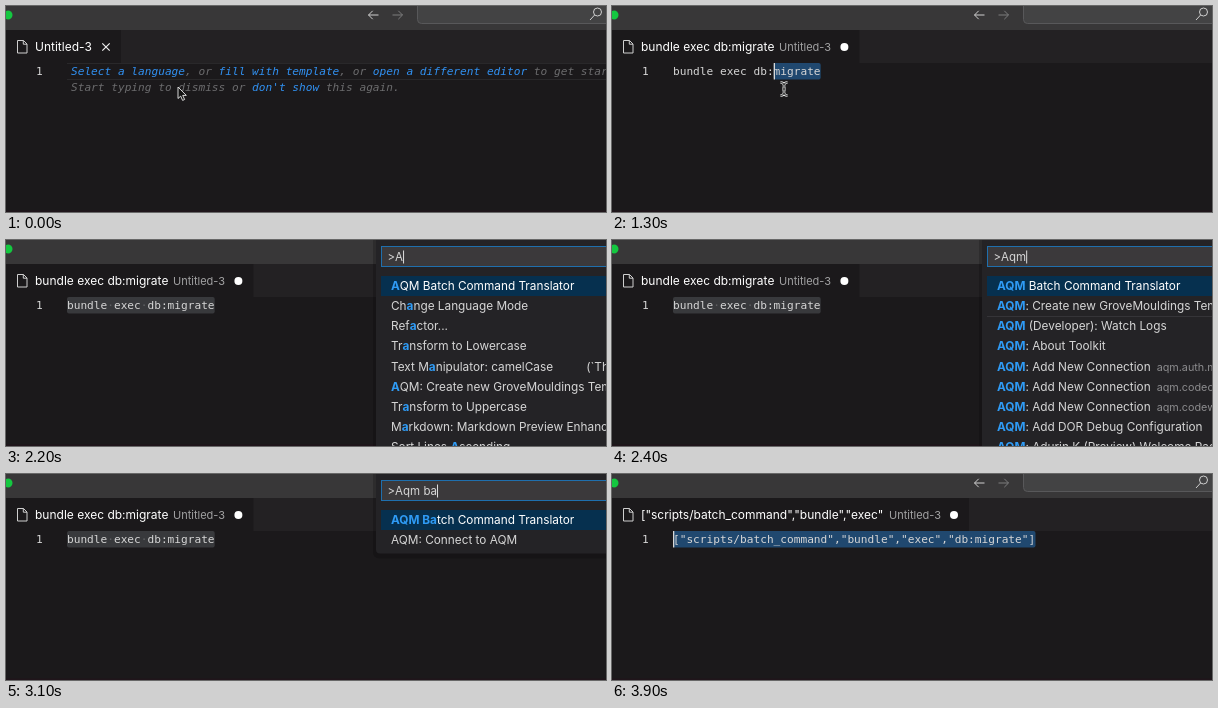
An HTML page for the animation above (4000 ms loop, 600 by 206 pixels).

```html
<!DOCTYPE html>
<html lang="en">
<head>
<meta charset="utf-8">
<title>Command palette demo</title>
<style>
html, body { margin: 0; width: 100%; height: 100%; overflow: hidden; background: #1b191b; }
svg { display: block; width: 600px; height: 206px; }
text { white-space: pre; font: 12px Inter, "Liberation Sans", sans-serif; fill: #d6d6d6; }
.code, .hint { font: 11.15px "DejaVu Sans Mono", monospace; }
.hint { font-style: italic; fill: #6c6c6e; }
.hint .hit { fill: #3191f2; }
.tab { fill: #fff; }
.note { font-size: 11px; fill: #a2a2a3; }
.row { font-size: 11.8px; }
.row:first-child { fill: #fff; }
.row .hit { fill: #2f9bf5; font-weight: 700; }
.row .detail { font-size: 10.8px; fill: #8b8b8d; }
.typed { font-size: 11.5px; }
.line { fill: none; stroke: #cfcfcf; stroke-width: 1; }
</style>
</head>
<body>
<svg viewBox="0 0 600 206">
  <rect width="600" height="206" fill="#1b191b"/>
  <rect y="204.5" width="600" height="1.5" fill="#20151b"/>
  <rect width="600" height="24" fill="#383738"/>
  <rect y="24" width="600" height="33" fill="#232123"/>
  <rect id="tabBack" y="24" height="33" fill="#1b191b"/>
  <circle cx="2" cy="9" r="4.5" fill="#14c840"/>

  <g id="navigation">
    <path class="line" d="M372.5 9H362.5m4.2-4.2L362.5 9l4.2 4.2"/>
    <path class="line" style="stroke:#7c7c7d" d="M386.5 9h10m-4.2-4.2L396.5 9l-4.2 4.2"/>
    <rect x="411.5" y="-8" width="220" height="25.5" rx="4" fill="#434344" stroke="#58585a"/>
    <circle class="line" cx="591.5" cy="6" r="4"/>
    <path class="line" d="M588.6 9l-4.6 5"/>
  </g>

  <path class="line" d="M11.5 34.5h6l3.5 3.5v9h-9.5zM17.3 34.5v3.7h3.7"/>
  <text id="tabTitle" class="tab" x="29" y="45"></text>
  <text id="tabNote" class="note" y="45">Untitled-3</text>
  <path id="tabClose" class="line" style="stroke:#eee;stroke-width:1.2" d="M96.3 37.3l7.4 7.4m0-7.4l-7.4 7.4"/>
  <circle id="tabDot" cy="41" r="4" fill="#fff"/>

  <path id="lineMark" d="M61 57.5h539M61 73.5h539" stroke="#29282a"/>
  <text class="code" x="30" y="68.5">1</text>
  <rect id="selection" y="57" height="16.5" rx="2"/>
  <g id="hint"></g>
  <text id="code" class="code" x="61" y="68.5"></text>
  <text id="spaces" class="code" x="61" y="68.5" opacity=".25"></text>
  <rect id="caret" y="57" width="1.3" height="16.5" fill="#d8d8d8"/>

  <path id="arrow" d="M172 81v11.5l2.7-2.4 1.9 4.3 2-.9-1.9-4.1h3.6z" fill="#111" stroke="#eee" stroke-width=".9"/>
  <g id="beam" fill="none"></g>

  <g id="palette">
    <rect id="shade" x="367" y="-6" width="240" rx="6" fill="#000" opacity=".2"/>
    <rect id="panel" x="370" y="-6" width="240" rx="4" fill="#242326"/>
    <rect x="375.5" y="6.5" width="240" height="20" fill="#3b393b" stroke="#1f6fad"/>
    <text id="typed" class="typed" x="381.5" y="21"></text>
    <rect id="typedCaret" y="10.5" width="1" height="13" fill="#ddd"/>
    <rect x="375" y="36" width="225" height="20" fill="#06304f"/>
    <path id="divider" d="M375 76.5h225" stroke="#353438"/>
    <g id="rows"></g>
  </g>
</svg>
<script>
const LOOP = 4000, STEP = 100, LEFT = 61, CHAR = 6.713, ROW = 20.2;
const COMMAND = "bundle exec db:migrate";
const RESULT = '["scripts/batch_command","bundle","exec","db:migrate"]';

// Asterisks enclose highlighted parts; a bar starts the dim detail.
const RECENT = [
  "*A*QM Batch Command Translator", "Ch*a*nge Language Mode", "Ref*a*ctor...",
  "Tr*a*nsform to Lowercase", "Text M*a*nipulator: camelCase          (`This`)",
  "*A*QM: Create new GroveMouldings Template", "Tr*a*nsform to Uppercase",
  "M*a*rkdown: Markdown Preview Enhanced", "Sort Lines *A*scending"
];
const MATCHES = [
  "*AQM* Batch Command Translator", "*AQM*: Create new GroveMouldings Template",
  "*AQM* (Developer): Watch Logs", "*AQM*: About Toolkit",
  "*AQM*: Add New Connection|aqm.auth.manage", "*AQM*: Add New Connection|aqm.codecase",
  "*AQM*: Add New Connection|aqm.codeworks", "*AQM*: Add DOR Debug Configuration",
  "*AQM*: Adurin K (Preview) Welcome Page"
];
const NARROWED = ["*AQM Ba*tch Command Translator", "AQM: Connect to AQM"];
const plain = rows => rows.map(row => row.replaceAll("*", ""));

const QUERIES = [
  [2000, ">", plain(RECENT)], [2200, ">A", RECENT], [2300, ">Aq", MATCHES],
  [2400, ">Aqm", MATCHES], [2600, ">Aqm ", MATCHES],
  [2900, ">Aqm b", [NARROWED[0].replace("Ba*", "B*a"), NARROWED[1]]],
  [3000, ">Aqm ba", NARROWED]
];
const WORD_STARTS = [15, 12, 7, 0];

const $ = id => document.getElementById(id);
const show = (id, on) => { $(id).style.display = on ? "" : "none"; };
const set = (id, attrs) => Object.entries(attrs).forEach(([k, v]) => $(id).setAttribute(k, v));

function markup(source) {
  const [label, detail] = source.split("|");
  const body = label.replace(/\*(.+?)\*/g, '<tspan class="hit">$1</tspan>');
  return body + (detail ? `<tspan class="detail" dx="6">${detail}</tspan>` : "");
}
const textLine = (cls, x, y, source) => `<text class="${cls}" x="${x}" y="${y}">${markup(source)}</text>`;

$("hint").innerHTML =
  textLine("hint", 65, 68.5, "*Select a language*, or *fill with template*, or *open a different editor* to get started.") +
  textLine("hint", 65, 85, "Start typing to dismiss or *don't show* this again.");

const BEAM = "M168.5 76.5q3.5 0 3.5 2.5v8q0 2.5-3.5 2.5M175.5 76.5q-3.5 0-3.5 2.5M175.5 89.5q-3.5 0-3.5-2.5M170 83h4";
$("beam").innerHTML = [["#eee", 2.6], ["#222", 1]]
  .map(([color, width]) => `<path d="${BEAM}" stroke="${color}" stroke-width="${width}"/>`).join("");

function drawTab(t) {
  const stage = t < 700 ? 0 : t < 3800 ? 1 : 2;
  const dot = [100, 232.4, 342][stage];
  $("tabTitle").textContent = ["Untitled-3", COMMAND, RESULT.slice(0, 40)][stage];
  set("tabNote", { x: [0, 167, 277][stage] });
  set("tabBack", { width: dot + 15 });
  set("tabDot", { cx: dot });
  show("tabNote", stage > 0);
  show("tabDot", t >= 100);
  show("tabClose", t < 100);
}

function drawEditor(t, paletteOpen) {
  const done = t >= 3700;
  const code = done ? RESULT : COMMAND.slice(0, Math.round(COMMAND.length * Math.min(1, t / 600)));
  const selecting = t >= 1300;
  const start = selecting ? WORD_STARTS[Math.min(3, Math.floor((t - 1300) / 100))] : code.length;
  const caretOn = (t >= 100 && t < 1100) || (t >= 1300 && t < 1800) || t >= 3600;
  $("code").textContent = code;
  $("spaces").textContent = selecting ? code.replace(/./g, (c, i) => c === " " && i >= start ? "·" : " ") : "";
  set("selection", {
    x: LEFT + start * CHAR, width: (code.length - start) * CHAR,
    fill: paletteOpen ? "#38393c" : "#20486f"
  });
  set("caret", { x: LEFT + start * CHAR });
  show("caret", caretOn);
  show("lineMark", !selecting);
  show("hint", t < 100);
  show("arrow", t < 100);
  show("beam", t >= 100 && t < 2000);
}

function drawPalette(t) {
  const [, query, rows] = QUERIES.findLast(q => t >= q[0]);
  const height = 36 + rows.length * ROW + 9;
  $("typed").textContent = query;
  set("typedCaret", { x: 381.5 + $("typed").getComputedTextLength() });
  set("panel", { height });
  set("shade", { height: height + 5 });
  show("divider", rows === MATCHES);
  $("rows").innerHTML = rows.map((row, i) => textLine("row", 385, 49.8 + i * ROW, row)).join("");
}

let last = -1;
function render(time) {
  const t = Math.floor((time % LOOP) / STEP) * STEP;
  if (t === last) return;
  last = t;
  const paletteOpen = t >= 2000 && t < 3600;
  show("palette", paletteOpen);
  show("navigation", !paletteOpen);
  drawTab(t);
  drawEditor(t, paletteOpen);
  if (paletteOpen) drawPalette(t);
}

const origin = performance.now();
function tick() {
  render(performance.now() - origin);
  requestAnimationFrame(tick);
}
tick();
</script>
</body>
</html>
```
